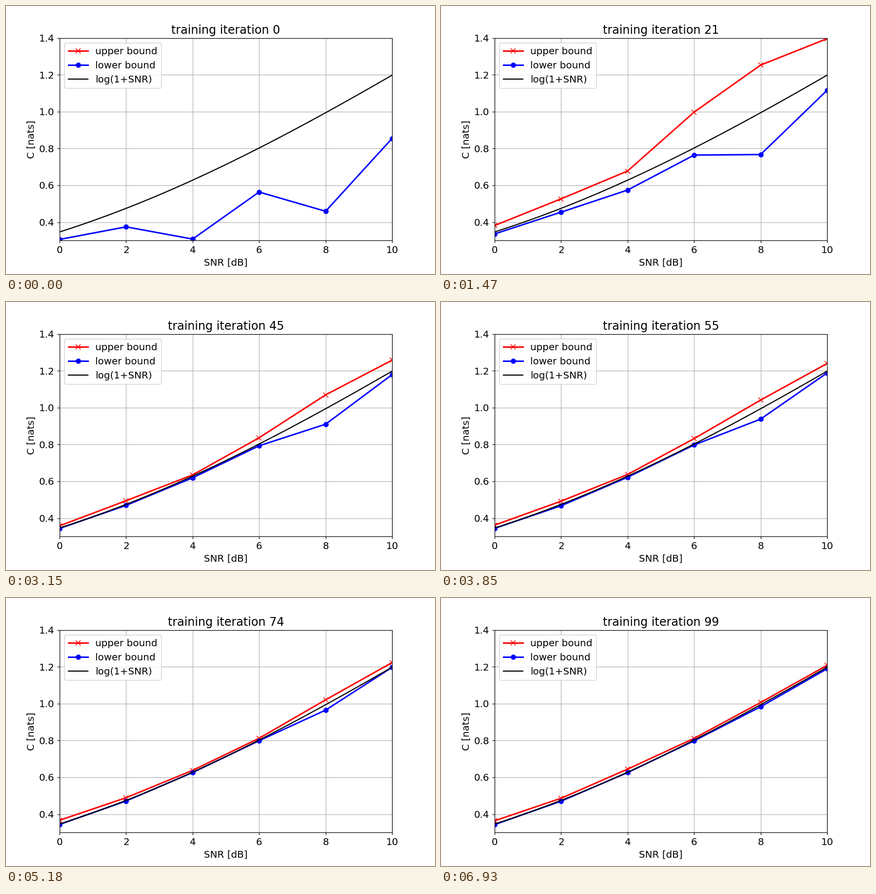
Write a matplotlib script that moves like this. It is 880 px wide and 550 px high and loops after 7000 ms.

```python
import numpy as np
import matplotlib.pyplot as plt
from matplotlib.animation import FuncAnimation

FRAMES, INTERVAL = 100, 70
SNR_DB = np.arange(0, 11, 2)
rng = np.random.default_rng(4)


def capacity(db):
    return 0.5 * np.log(1 + 10 ** (db / 10))


def gap(start, tau, floor, noise):
    """Distance to capacity per step and SNR: exponential decay plus noise."""
    step = np.arange(FRAMES)[:, None]
    decay = np.array(start) * np.exp(-step / np.array(tau))
    return floor + decay + rng.normal(0, noise, decay.shape)


lower_path = capacity(SNR_DB) - gap(
    start=[.038, .097, .313, .234, .535, .340],
    tau=[11, 11, 11, 11, 24, 14], floor=0.004, noise=0.002)
upper_path = capacity(SNR_DB) + gap(
    start=[1.4, 1.2, 1.2, 1.25, .73, .59],
    tau=[5, 6, 6, 10.8, 19, 18], floor=0.014, noise=0.004)

plt.rcParams.update({"font.family": "DejaVu Sans", "font.size": 13})
fig, ax = plt.subplots(figsize=(8, 5), dpi=110)
fig.subplots_adjust(left=0.125, right=0.9, bottom=0.125, top=0.88)

upper, = ax.plot(SNR_DB, upper_path[0], "rx-", lw=2, label="upper bound")
lower, = ax.plot(SNR_DB, lower_path[0], "bo-", lw=2, label="lower bound")
fine_db = np.linspace(0, 10, 100)
ax.plot(fine_db, capacity(fine_db), "k", lw=1.5, label="log(1+SNR)")

ax.set(xlim=(0, 10), ylim=(0.3, 1.4), xlabel="SNR [dB]", ylabel="C [nats]")
ax.grid(True)
ax.legend(loc="upper left")
title = ax.set_title("training iteration 0")


def update(step):
    upper.set_ydata(upper_path[step])
    lower.set_ydata(lower_path[step])
    title.set_text(f"training iteration {step}")
    return upper, lower, title


anim = FuncAnimation(fig, update, frames=FRAMES, interval=INTERVAL,
                     repeat=True, repeat_delay=0, blit=False)
plt.show()
```
